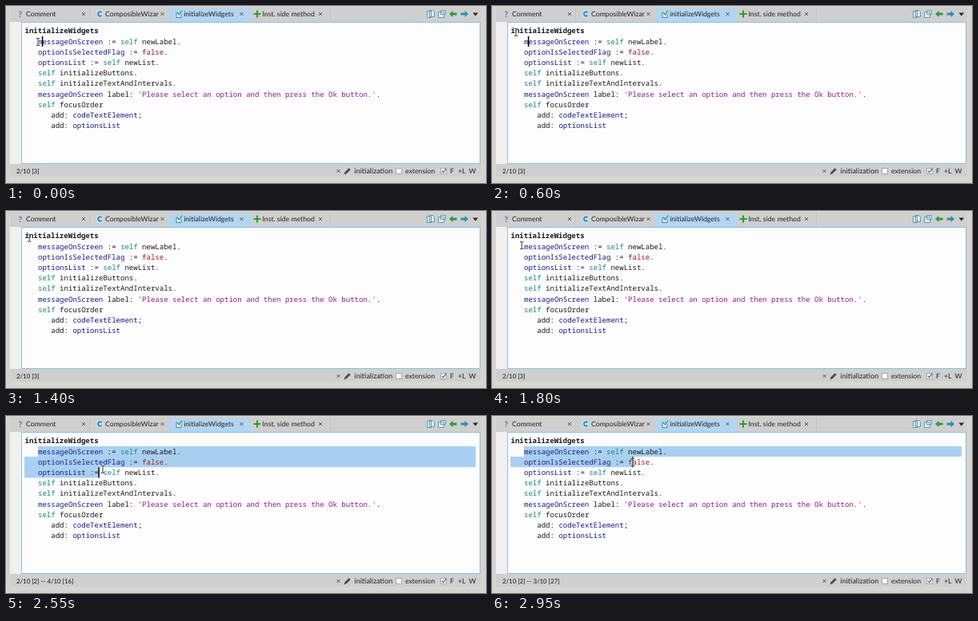
An HTML page for the animation above (3 s loop, 600x222 px).

```html
<!DOCTYPE html>
<html lang="en">
<head>
<meta charset="utf-8">
<title>Code editor selection</title>
<style>
  html, body { margin: 0; width: 600px; height: 222px; overflow: hidden; background: #d6d6d2; }
  svg { display: block; }
  text { white-space: pre; text-rendering: geometricPrecision; }
  .ui { font: 8.7px Lato, "Open Sans", sans-serif; fill: #222; }
  .pos { font-size: 7.85px; font-weight: 500; }
  .code { font: 9.04px "Noto Sans Mono", "DejaVu Sans Mono", monospace; fill: #1c1c1c; }
  .title { font-weight: 700; }
  .var { fill: #1a1a8c; }
  .self { fill: #1f8482; }
  .lit { fill: #952020; }
  .str { fill: #8f1c8d; }
  .line { fill: none; stroke: #4a4a4a; stroke-width: .9; }
  .box { fill: #f8f8f8; stroke: #a4a8ab; }
</style>
</head>
<body>
<svg id="stage" width="600" height="222" viewBox="0 0 600 222">
  <rect width="600" height="222" fill="#d6d6d2"/>
  <path d="M2 2.5H597.5V219.5H2.5V2" fill="none" stroke="#cdccc4"/>
  <rect x="5" y="3" width="589" height="211" fill="#cfcfcf"/>
  <path d="M104.500 3V19M405.500 3V19" stroke="#c3c3c3"/>
  <rect x="203.500" y="3" width="103" height="17" fill="#b3d5f2"/>
  <rect x="5" y="20" width="14" height="178" fill="#f0f0f0"/>
  <rect x="19.500" y="20.500" width="573" height="177" fill="#fdfdfd" stroke="#8fbfe2"/>
  <g id="tabs"></g>

  <!-- tab icons -->
  <text class="ui" x="15.500" y="13.500" style="font-size:10px;font-weight:700;fill:#3b8296">?</text>
  <rect x="112.500" y="5" width="9.500" height="10" rx="1.500" fill="#c5dcea"/>
  <path d="M119.500 8.300A2.600 2.600 0 1 0 119.500 11.700" fill="none" stroke="#2f7fae" stroke-width="1.600"/>
  <path d="M213 7.500v7h6v-4" fill="#e4f1f8" stroke="#3d86a8"/>
  <path d="M214 8l2.500 3 3.500-5.500" fill="none" stroke="#379a5c" stroke-width="1.300"/>
  <path d="M314 5.500v9M309.500 10h9" stroke="#2f9a32" stroke-width="2"/>

  <!-- toolbar -->
  <g fill="#e2eef4" stroke="#5b9ab5">
    <path d="M526.500 6.500h5v8h-5zM529.500 5.500h4l2 2v6h-6z"/>
    <path d="M540.500 7.500h7v7h-7zM543.500 5.500h6v5h-6z"/>
  </g>
  <path d="M554 10l4.500-4v2.500h5v3h-5v2.500z" fill="#2f9a44"/>
  <path d="M578 10l-4.500-4v2.500h-5v3h5v2.500z" fill="#2f90ad"/>
  <path d="M583.500 8.500h6.500l-3.250 4z" fill="#222"/>

  <!-- status bar -->
  <text id="pos" class="ui pos" x="13" y="210"></text>
  <path class="line" d="M413.500 205l4 4m0-4l-4 4"/>
  <path d="M422.500 211.500l1.200-3.300 5-5 2 2-5 5z" fill="#4a4a4a"/>
  <text class="ui" x="435.500" y="210" style="font-size:9px">initialization</text>
  <rect class="box" x="487.500" y="203.500" width="7" height="7"/>
  <text class="ui" x="499" y="210">extension</text>
  <rect class="box" x="543.500" y="203.500" width="7" height="7"/>
  <path d="M545 206.800l1.700 2 3.300-4.600" fill="none" stroke="#2d6f9e" stroke-width="1.300"/>
  <text class="ui" x="555" y="210">F</text>
  <text class="ui" x="565" y="210">+L</text>
  <text class="ui" x="578.500" y="210">W</text>

  <path id="selection" fill="#a9d0f1"/>
  <g id="code"></g>
  <rect id="caret" width="1.500" height="13.200" fill="#000"/>
  <g id="pointer" fill="none">
    <path d="M-2.200-4.500h1.400l.8.700.8-.7h1.400M0-4v8M-2.200 4.500h1.400l.8-.7.8.700h1.400" stroke="#fff" stroke-width="2.200" opacity=".7"/>
    <path d="M-2.200-4.500h1.400l.8.700.8-.7h1.400M0-4v8M-2.200 4.500h1.400l.8-.7.8.700h1.400" stroke="#222" stroke-width=".9"/>
  </g>
</svg>
<script>
const $ = id => document.getElementById(id);
const LOOP = 3000, STEP = 50, PRESS = 1900;
const CHAR = 5.424, ROW = 13.2, LEFT = 23, INDENT = 40, RIGHT = 587, TOP = 37.9;

const tabs = [
  [25, "Comment", 97], [124, "ComposibleWizar", 195.5],
  [222.2, "initializeWidgets", 294.5], [320.5, "Inst. side method", 393]
];
$("tabs").innerHTML = tabs.map(([x, label, close]) =>
  `<text class="ui" x="${x}" y="13">${label}</text>` +
  `<path class="line" d="M${close - 2} 8l4 4m0-4l-4 4"/>`).join("");

const source = [
  "messageOnScreen := self newLabel.",
  "optionIsSelectedFlag := false.",
  "optionsList := self newList.",
  "self initializeButtons.",
  "self initializeTextAndIntervals.",
  "messageOnScreen label: 'Please select an option and then press the Ok button.'.",
  "self focusOrder",
  "   add: codeTextElement;",
  "   add: optionsList"
];
const token = /'[^']*'|\b(?:self|false|messageOnScreen|option\w+|codeTextElement)\b/g;
const kind = word => word[0] === "'" ? "str" : word === "self" ? "self" : word === "false" ? "lit" : "var";
const paint = line => line.replace(token, word => `<tspan class="${kind(word)}">${word}</tspan>`);
$("code").innerHTML =
  `<text class="code title" x="23.5" y="34.4">initializeWidgets</text>` +
  source.map((line, i) => {
    const body = line.trimStart();
    const x = INDENT + (line.length - body.length) * CHAR;
    return `<text class="code" x="${x}" y="${34.4 + ROW * (i + 1)}">${paint(body)}</text>`;
  }).join("");

// time, x, y of the mouse pointer
const path = [
  [0, 40, 45], [150, 39, 44], [600, 30, 33], [1050, 26.5, 30.5], [1300, 27, 31],
  [1750, 37, 43], [1900, 37.5, 43.5], [2200, 71.5, 57.5], [2550, 121, 67], [2950, 176, 58], [3000, 176, 58]
];

function pointerAt(t) {
  const i = path.findIndex(p => p[0] > t);
  const [a, b] = [path[i - 1], path[i]];
  const k = (t - a[0]) / (b[0] - a[0]);
  return [a[1] + (b[1] - a[1]) * k, a[2] + (b[2] - a[2]) * k];
}

function selectionShape(row, x) {
  const y = TOP + ROW * row;
  if (row === 0) return `M${INDENT} ${TOP}H${x}v${ROW}H${INDENT}z`;
  const full = row > 1 ? `M${LEFT} ${TOP + ROW}H${RIGHT}V${y}H${LEFT}z` : "";
  return `M${INDENT} ${TOP}H${RIGHT}v${ROW}H${INDENT}z${full}M${LEFT} ${y}H${x}v${ROW}H${LEFT}z`;
}

function draw(t) {
  const [px, py] = pointerAt(t);
  const dragging = t >= PRESS;
  const row = dragging ? Math.max(0, Math.floor((py - TOP) / ROW)) : 0;
  const col = dragging ? Math.max(0, Math.floor((px - INDENT) / CHAR)) : 1;
  const x = INDENT + col * CHAR;
  const place = `${row + 2}/10 [${col + 2}]`;

  $("pointer").setAttribute("transform", `translate(${px} ${py})`);
  $("caret").setAttribute("x", x - 0.6);
  $("caret").setAttribute("y", TOP + ROW * row);
  $("caret").style.visibility = !dragging && t >= 1300 ? "hidden" : "visible";
  $("selection").setAttribute("d", dragging ? selectionShape(row, x) : "");
  $("pos").textContent = dragging && row + col > 0 ? `2/10 [2] -- ${place}` : place;
}

const start = performance.now();
function tick() {
  const t = (performance.now() - start) % LOOP;
  draw(Math.floor(t / STEP) * STEP);
  requestAnimationFrame(tick);
}
tick();
</script>
</body>
</html>
```
